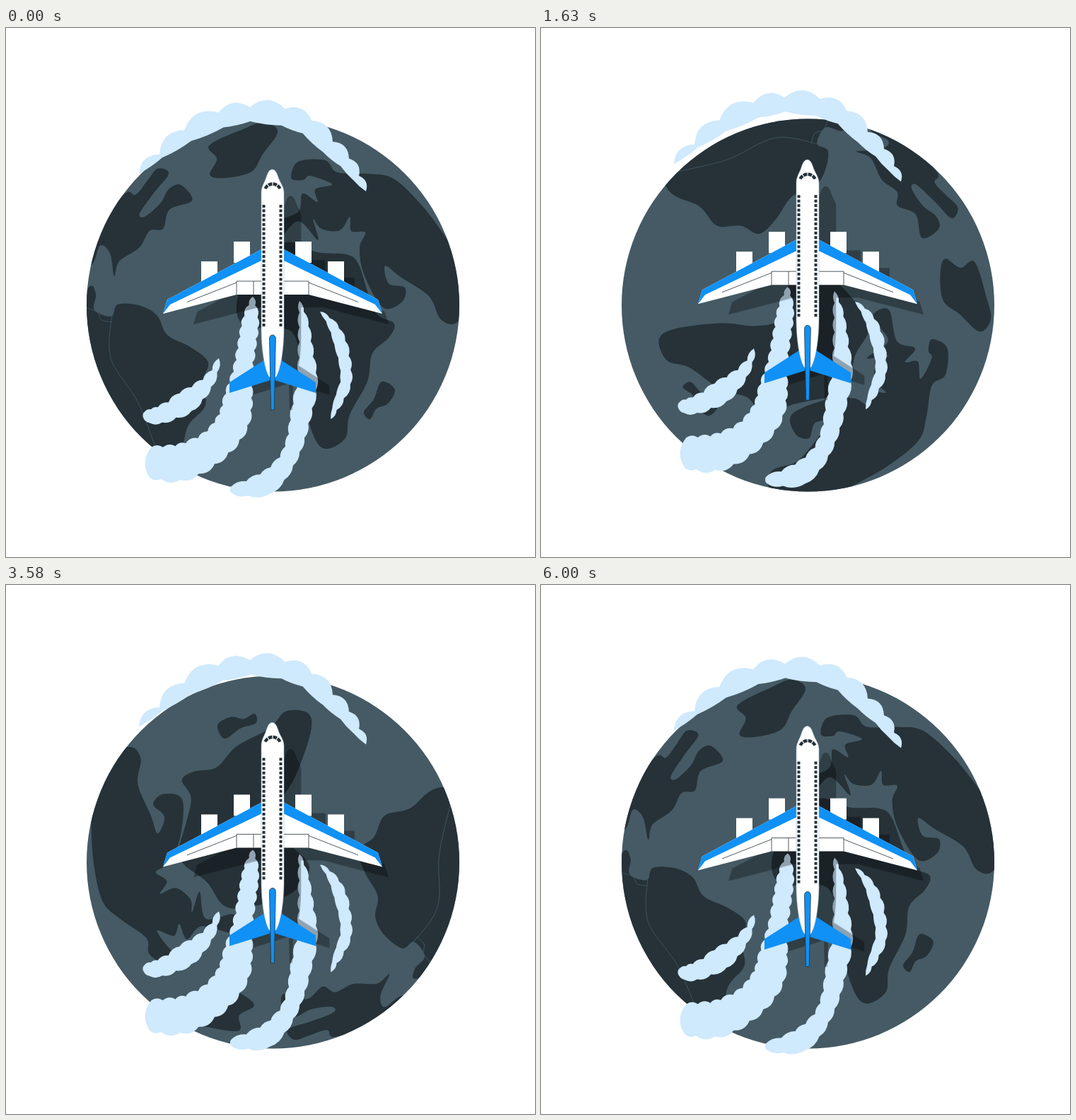
Write an HTML page with a canvas that moves like this. It is 748 px wide and 748 px high and loops after 6040 ms.

```html
<!DOCTYPE html>
<html lang="en">
<head>
<meta charset="utf-8">
<title>Plane above the globe</title>
<style>
html, body { margin: 0; width: 100%; height: 100%; overflow: hidden; background: #fff; }
canvas { display: block; width: 748px; height: 748px; }
</style>
</head>
<body>
<canvas id="stage" width="748" height="748"></canvas>
<script>
const SIZE = 748, LOOP = 6040, BOB = 15, TAU = 2 * Math.PI;
const CX = 377.5, CY = 392, R = 263.5, MID = 377;
const SEA = '#455a64', LAND = '#263238', BLUE = '#1091f5', CLOUD = '#cfe9fd';
const ctx = document.getElementById('stage').getContext('2d');

const pts = s => s.trim().split(/\s+/).map(p => p.split(',').map(Number));
const clamp = (v, lo, hi) => Math.max(lo, Math.min(hi, v));

// Catmull-Rom spline at u, for points of any dimension
function spline(P, u, closed) {
  const n = P.length, i = Math.floor(u), f = u - i;
  const at = j => P[closed ? (j + n) % n : clamp(j, 0, n - 1)];
  const a = at(i - 1), b = at(i), c = at(i + 1), d = at(i + 2);
  return b.map((v, k) => v + f / 2 * (c[k] - a[k]
    + f * (2 * a[k] - 5 * v + 4 * c[k] - d[k] + f * (3 * (v - c[k]) + d[k] - a[k]))));
}

function blob(s, closed = true) {
  const P = pts(s), path = new Path2D(), steps = 8;
  const last = (closed ? P.length : P.length - 1) * steps;
  for (let i = 0; i <= last; i++) path.lineTo(...spline(P, i / steps, closed));
  return path;
}

function poly(s) {
  const path = new Path2D();
  pts(s).forEach(p => path.lineTo(...p));
  path.closePath();
  return path;
}

// Scalloped edge: each pair of points is joined by a bulge
function puffs(path, P, k) {
  for (let i = 1; i < P.length; i++) {
    const [ax, ay] = P[i - 1], [bx, by] = P[i];
    path.quadraticCurveTo((ax + bx) / 2 + k * (by - ay), (ay + by) / 2 - k * (bx - ax), bx, by);
  }
}

// Smoke along a spine of x,y,half-width keys, with n puffs on each side
function smoke(s, n, kLeft, kRight) {
  const keys = pts(s), left = [], right = [];
  const at = i => spline(keys, clamp(i / n, 0, 1) * (keys.length - 1));
  for (let i = 0; i <= n; i++) {
    const [x, y, w] = at(i), a = at(i - 0.5), b = at(i + 0.5);
    const dx = b[0] - a[0], dy = b[1] - a[1], m = w / Math.hypot(dx, dy);
    left.push([x + dy * m, y - dx * m]);
    right.unshift([x - dy * m, y + dx * m]);
  }
  const path = new Path2D();
  path.moveTo(...left[0]);
  puffs(path, left, kLeft);
  puffs(path, [left[n], ...right], kRight);
  return path;
}

const lands = {
  northAmerica: `162,240 183,236 199,217 214,199 230,206 210,232 189,262 196,267 218,248 230,228
    247,222 263,244 231,257 222,284 203,287 188,311 160,330 153,351 147,319 133,308 120,336 85,345`,
  southAmerica: `113,372 127,376 125,399 149,408 158,391 190,393 214,407 228,434 262,452 286,473
    278,500 282,534 258,562 234,614 130,640 60,480`,
  greenland: `384,147 365,133 335,143 287,166 298,185 288,208 311,212 347,203 363,178`,
  africa: `481,320 498,333 512,375 525,405 549,418 541,438 518,460 511,500 486,547 480,580
    452,595 434,574 418,510 416,462 402,428 366,425 331,415 328,380 352,340 396,303 440,317`,
  eurasia: `512,206 548,213 590,253 628,304 670,360 640,414 615,412 598,379 558,352 536,336
    541,361 564,367 560,387 533,395 506,348 500,310 508,289 488,287 486,267 472,286 446,284
    434,270 441,300 413,273 383,300 369,278 412,261 419,234 440,246 437,228 461,221 430,209
    420,215 403,212 413,189 451,187 468,204`,
  madagascar: `531,500 550,511 540,531 524,538 515,553 506,543 520,525`
};
const landPaths = Object.values(lands).map(s => blob(s));

const borders = [
  '113,396 129,402 135,413 150,416',
  '151,398 148,466 187,530 213,598'
].map(s => blob(s, false));

const clouds = [
  smoke(`188,206,0 219,181,3 257,152,9 304,130,11 345,122,10 392,126,12 426,140,11 455,168,10
    479,190,8 495,212,5 509,231,0`, 10, 0.45, 0.06),
  smoke(`349,380,0 346,412,10 341,446,11 335,484,12 329,520,18 320,558,21 292,592,21 248,614,24
    204,614,21`, 18, 0.35, 0.35),
  smoke('301,467,0 292,492,5 275,512,10 254,529,15 229,543,11 208,549,11 195,546,4', 8, 0.3, 0.3),
  smoke(`415,386,0 421,420,6 424,460,9 426,502,13 417,546,13 409,584,11 394,617,11 364,646,15
    318,653,4`, 15, 0.25, 0.25),
  smoke('444,401,0 461,420,5 472,445,8 479,475,7 480,502,7 468,530,5 459,553,0', 9, 0.3, 0.1)
];

const body = new Path2D(`M376.5 200 C372 200 370 205 368 211 C365 220 361 224 361 233
  L361 425 C361 455 366 484 372 493 Q377 500 382 493 C388 484 393 455 393 425
  L393 233 C393 224 388 220 385 211 C383 205 381 200 376.5 200 Z`);
const fin = new Path2D('M372.5 439 A4.4 5 0 0 1 381.3 439 L379.3 540 L374.6 540 Z');
const wing = poly('377,305 361,313 228,384 222,404 326,377 377,377');
const wingEdge = poly('361,313 228,384 222,404 232,391 361,329');
const tail = poly('377,464 366,469 316,501 316,516 377,497');
const flaps = new Path2D('M361 358 H326 V377 M326 360 L256 387.5');
const hinge = new Path2D('M350 358 V377');

function both(g, draw) {
  draw();
  g.save();
  g.translate(2 * MID, 0);
  g.scale(-1, 1);
  draw();
  g.restore();
}

function engines(g) {
  g.fillRect(322, 302, 23, 30);
  g.fillRect(276, 330, 23, 32);
}

function makeShadow() {
  const c = document.createElement('canvas');
  c.width = c.height = SIZE;
  const g = c.getContext('2d');
  g.translate(403, 540);
  g.scale(0.89, 0.89);
  g.translate(-MID, -540);
  both(g, () => { g.fill(wing); g.fill(tail); engines(g); });
  g.fill(body);
  g.fill(fin);
  return c;
}
const shadow = makeShadow();

function drawGlobe(angle) {
  ctx.save();
  ctx.beginPath();
  ctx.arc(CX, CY, R, 0, TAU);
  ctx.fillStyle = SEA;
  ctx.fill();
  ctx.clip();
  ctx.translate(CX, CY);
  ctx.rotate(angle);
  ctx.translate(-CX, -CY);
  ctx.fillStyle = LAND;
  landPaths.forEach(p => ctx.fill(p));
  ctx.strokeStyle = SEA;
  ctx.lineWidth = 0.8;
  borders.forEach(p => ctx.stroke(p));
  ctx.restore();
}

function drawCockpit() {
  ctx.strokeStyle = LAND;
  ctx.lineWidth = 4.4;
  for (let i = 0; i < 4; i++) {
    const a = (205 + i * 34) * TAU / 360;
    ctx.beginPath();
    ctx.arc(MID, 232, 11.5, a, a + 0.49);
    ctx.stroke();
  }
}

function drawPlane() {
  ctx.lineWidth = 0.8;
  ctx.strokeStyle = LAND;
  both(ctx, () => {
    ctx.fillStyle = '#fff';
    engines(ctx);
    ctx.fill(wing);
    ctx.fillStyle = BLUE;
    ctx.fill(wingEdge);
    ctx.fill(tail);
    ctx.stroke(flaps);
  });
  ctx.stroke(hinge);

  ctx.fillStyle = '#fff';
  ctx.fill(body);
  ctx.lineWidth = 0.5;
  ctx.strokeStyle = '#8fb6d3';
  ctx.stroke(body);

  ctx.fillStyle = LAND;
  for (let i = 0; i < 27; i++) {
    ctx.fillRect(362.5, 250 + i * 6.46, 4, 4);
    ctx.fillRect(386.5, 250 + i * 6.46, 4, 4);
  }
  drawCockpit();

  ctx.fillStyle = BLUE;
  ctx.fill(fin);
  ctx.lineWidth = 0.8;
  ctx.stroke(fin);
}

function draw(now) {
  const t = now % LOOP / LOOP;
  const bob = -BOB * (1 - Math.abs(1 - (t * 2 % 1) * 2));
  ctx.fillStyle = '#fff';
  ctx.fillRect(0, 0, SIZE, SIZE);
  drawGlobe(t * TAU);
  ctx.save();
  ctx.translate(0, bob);
  ctx.fillStyle = CLOUD;
  clouds.forEach(p => ctx.fill(p));
  ctx.globalAlpha = 0.3;
  ctx.drawImage(shadow, 0, 0);
  ctx.globalAlpha = 1;
  drawPlane();
  ctx.restore();
}

const start = performance.now();
function tick() {
  draw(performance.now() - start);
  requestAnimationFrame(tick);
}
tick();
</script>
</body>
</html>
```
